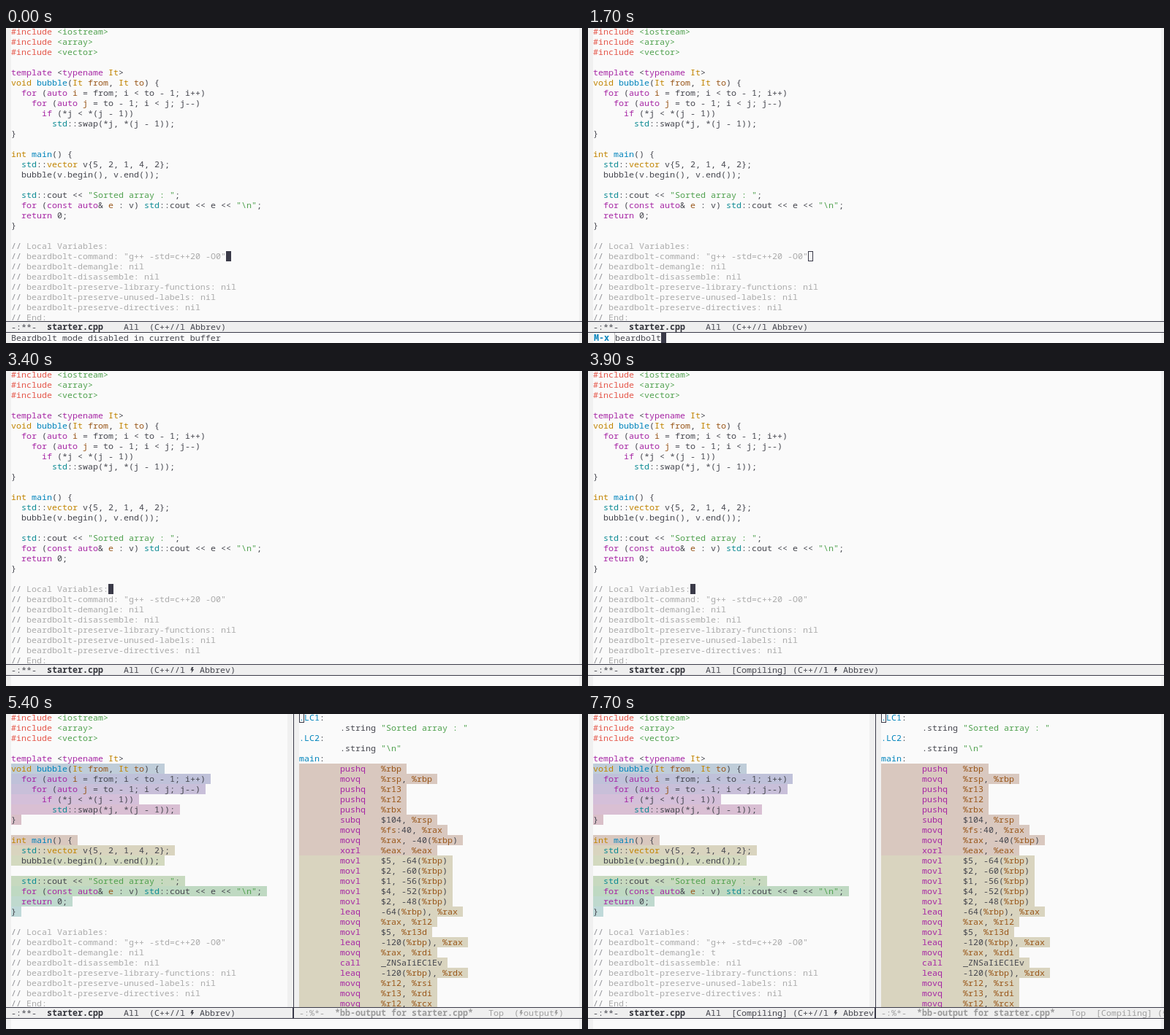
Recreate the animation shown at these times as an HTML page. Size 788x432 px, loop 8000 ms.

```html
<!DOCTYPE html>
<html lang="en">
<head>
<meta charset="utf-8">
<title>Editor session</title>
<style>
  html, body { margin: 0; width: 100%; height: 100%; overflow: hidden; background: #fafafa; }
  svg { display: block; width: 788px; height: 432px; }
  text { white-space: pre; font-kerning: none; font-variant-ligatures: none; }
</style>
</head>
<body>
<svg id="stage" viewBox="0 0 788 432" width="788" height="432">
  <defs>
    <clipPath id="paneClip"><rect width="788" height="402"/></clipPath>
    <clipPath id="leftClip"><rect id="leftBar" y="402" width="788" height="16"/></clipPath>
  </defs>
</svg>
<script>
const NS = 'http://www.w3.org/2000/svg';
const LOOP = 8000, CW = 7, LH = 14, LEFT = 7, RIGHT = 401;
const INK = '#3a3a48', PAPER = '#fafafa', FRINGE = '#f0f0f0';
const FONT = '"Noto Sans Mono", "DejaVu Sans Mono", monospace';

// One style letter per kind of token
const STYLES = {
  d: '#45464e', r: '#e45649', s: '#50a14f', k: '#a626a4', t: '#c18401',
  f: '#0184bc', v: '#99571a', n: '#0b8a93', m: '#8f9095', c: '#ababab',
  b: '#33343b', g: '#a0a0a0', G: '#9a9a9a', p: '#0a85bd'
};
const BOLD = 'bGp';

const svg = document.getElementById('stage');

// Pick the size at which one character is exactly one cell wide
const pen = document.createElement('canvas').getContext('2d');
pen.font = '100px ' + FONT;
const SIZE = CW * 100 / pen.measureText('M').width;
svg.setAttribute('font-family', FONT);
svg.setAttribute('font-size', SIZE);

function add(parent, tag, attrs, text) {
  const el = document.createElementNS(NS, tag);
  for (const key in attrs) el.setAttribute(key, attrs[key]);
  if (text !== undefined) el.textContent = text;
  parent.appendChild(el);
  return el;
}
const group = (parent, attrs) => add(parent, 'g', attrs);
const rect = (parent, x, y, width, height, fill) =>
  add(parent, 'rect', { x, y, width, height, fill });
const show = (el, on) => el.setAttribute('display', on ? 'inline' : 'none');
const rowTop = row => row * LH - 2;

function bolt(parent, x, base, fill) {
  add(parent, 'path', {
    d: `M${x + 2} ${base - 8}h2.4l-1 3h1.8l-3.8 5.6 .9-4.2h-1.8z`, fill
  });
}

// Odd pieces between bars start with a style letter; ⚡ is drawn as a shape
function write(parent, x, base, markup, plain = 'd') {
  markup.split('|').forEach((piece, i) => {
    const kind = i % 2 ? piece[0] : plain;
    const body = i % 2 ? piece.slice(1) : piece;
    for (const part of body.match(/⚡|\s+|[^\s⚡]+/g) || []) {
      if (part === '⚡') {
        bolt(parent, x, base, STYLES[kind]);
        x += 6;
        continue;
      }
      if (part.trim()) {
        add(parent, 'text', {
          x, y: base, fill: STYLES[kind],
          'font-weight': BOLD.includes(kind) ? 700 : 400
        }, part);
      }
      x += part.length * CW;
    }
  });
}

const bare = markup => markup.split('|').map((s, i) => i % 2 ? s.slice(1) : s).join('');

const comment = text => '|m//||c ' + text + '|';
const source = [
  '|r#include| |s<iostream>|',
  '|r#include| |s<array>|',
  '|r#include| |s<vector>|',
  '',
  '|ktemplate| <|ktypename| |tIt|>',
  '|tvoid| |fbubble|(|tIt| |vfrom|, |tIt| |vto|) {',
  '  |kfor| (|kauto| |vi| = from; i < to - 1; i++)',
  '    |kfor| (|kauto| |vj| = to - 1; i < j; j--)',
  '      |kif| (*j < *(j - 1))',
  '        |nstd|::swap(*j, *(j - 1));',
  '}',
  '',
  '|tint| |fmain|() {',
  '  |nstd|::|tvector| v{5, 2, 1, 4, 2};',
  '  bubble(v.begin(), v.end());',
  '',
  '  |nstd|::cout << |s"Sorted array : "|;',
  '  |kfor| (|kconst| |kauto|& |ve| : v) |nstd|::cout << e << |s"\\n"|;',
  '  |kreturn| 0;',
  '}',
  '',
  ...['Local Variables:', 'beardbolt-command: "g++ -std=c++20 -O0"',
    'beardbolt-demangle: ', 'beardbolt-disassemble: nil',
    'beardbolt-preserve-library-functions: nil',
    'beardbolt-preserve-unused-labels: nil',
    'beardbolt-preserve-directives: nil', 'End:'].map(comment)
];

const op = line => {
  const [name, ...args] = line.split(' ');
  const rest = args.join(' ').replace(/%\w+/g, '|v$&|');
  return '        |k' + name + '|' + ' '.repeat(8 - name.length) + rest;
};
const assembly = [
  '|f.LC1|:', '        .string |s"Sorted array : "|',
  '|f.LC2|:', '        .string |s"\\n"|', '|fmain|:',
  ...`pushq %rbp
movq %rsp, %rbp
pushq %r13
pushq %r12
pushq %rbx
subq $104, %rsp
movq %fs:40, %rax
movq %rax, -40(%rbp)
xorl %eax, %eax
movl $5, -64(%rbp)
movl $2, -60(%rbp)
movl $1, -56(%rbp)
movl $4, -52(%rbp)
movl $2, -48(%rbp)
leaq -64(%rbp), %rax
movq %rax, %r12
movl $5, %r13d
leaq -120(%rbp), %rax
movq %rax, %rdi
call _ZNSaIiEC1Ev
leaq -120(%rbp), %rdx
movq %r12, %rsi
movq %r13, %rdi
movq %r12, %rcx`.split('\n').map(op)
];

// Matching lines share a hue on both sides
const tint = step => `hsl(${22 + step * 26.5} 26% 80%)`;
const tintRows = [12, 13, 14, 16, 17, 18, 19, 5, 6, 7, 8, 9, 10];

function shade(parent, x, row, markup, step) {
  rect(parent, x, rowTop(row), (bare(markup).length + 1) * CW, LH, tint(step));
}
function listing(parent, x, lines) {
  lines.forEach((line, row) => write(parent, x, rowTop(row) + 11, line));
}
function outline(parent, x, y) {
  return add(parent, 'rect', {
    x: x + .5, y: y + .5, width: CW - 1, height: LH - 1,
    fill: 'none', stroke: INK, 'stroke-width': 1
  });
}

rect(svg, 0, 0, 788, 432, PAPER);
rect(svg, 0, 0, 7, 432, FRINGE);
rect(svg, 784, 0, 4, 432, FRINGE);

const panes = group(svg, { 'clip-path': 'url(#paneClip)' });
const split = group(panes);
rect(split, 385, 0, 16, 402, FRINGE);
tintRows.forEach((row, step) => shade(split, LEFT, row, source[row], step));
assembly.forEach((line, row) => {
  if (row > 4) shade(split, RIGHT, row, line, row < 14 ? 0 : 1);
});
listing(panes, LEFT, source);
listing(split, RIGHT, assembly);
outline(split, RIGHT, -2);
rect(split, 393, 0, 1, 402, INK);

const option = add(panes, 'text', { x: 168, y: rowTop(23) + 11, fill: STYLES.c });

// Mode lines
rect(svg, 0, 402, 788, 16, '#efefef');
const leftText = group(svg, { 'clip-path': 'url(#leftClip)' });
const rightText = group(svg);
rect(svg, 0, 402, 788, 1, INK);
rect(svg, 0, 417, 788, 1, INK);
const barEdge = rect(svg, 392, 402, 2, 16, INK);
const leftBar = document.getElementById('leftBar');

function modeLine(parent, x, name, where, tail, plain) {
  if (parent.dataset.tail === tail) return;
  parent.dataset.tail = tail;
  parent.replaceChildren();
  write(parent, x, 414, name + where + tail, plain);
}

const echo = add(svg, 'text', { x: LEFT, y: 429, fill: STYLES.d });
const prompt = group(svg);
write(prompt, 8, 429, '|pM-x|');
rect(prompt, 36, 418, 1, 14, '#b8b8b8');
const input = add(prompt, 'text', { x: 37, y: 429, fill: STYLES.d });

const hollow = outline(svg, 301, rowTop(22));
const block = rect(svg, 0, 0, CW, LH, INK);
const under = add(svg, 'text', { fill: PAPER });

const COMMAND = 'beardbolt-mode';
// time, characters typed
const typed = [[400, 0], [700, 2], [900, 3], [1000, 4], [1200, 5], [1400, 6], [1500, 7],
  [1600, 8], [1700, 9], [1800, 11], [1900, 12], [2000, 13], [2100, 14]];
// time, row, column, lit
const moves = [[0, 22, 42, 1], [2900, 22, 42, 0], [3400, 21, 19, 1], [4400, 21, 19, 0],
  [4900, 21, 19, 1], [5400, 21, 19, 0], [5900, 21, 19, 1], [6000, 22, 19, 1],
  [6300, 23, 19, 1], [6400, 23, 26, 1], [6800, 23, 23, 1], [7100, 23, 24, 1],
  [7600, 23, 24, 0]];
const latest = (list, t) => list.filter(entry => entry[0] <= t).pop();

function render(t) {
  const asking = t >= 400 && t < 2300;
  const isSplit = t >= 4300;
  const busy = (t >= 3900 && t < 4300) || t >= 7700 ? '[Compiling] ' : '';

  show(split, isSplit);
  show(rightText, isSplit);
  show(barEdge, isSplit);
  leftBar.setAttribute('width', isSplit ? 392 : 788);
  option.textContent = t < 6800 ? 'nil' : t < 7100 ? '' : 't';

  modeLine(leftText, LEFT, '-:**-  |bstarter.cpp|', '    All  ',
    busy + (t < 2300 ? '(C++//l Abbrev)' : '(C++//l ⚡ Abbrev)'), 'd');
  modeLine(rightText, RIGHT, '-:%*-  |G*bb-output for starter.cpp*|', '   Top  ',
    busy + '(⚡output⚡)', 'g');

  echo.textContent = asking || t >= 3400 ? ''
    : `Beardbolt mode ${t < 400 ? 'disabled' : 'enabled'} in current buffer`;
  show(prompt, asking);
  show(hollow, asking);

  let x, y, lit = 1, letter = '';
  if (asking) {
    const count = latest(typed, t)[1];
    input.textContent = COMMAND.slice(0, count);
    x = 37 + count * CW;
    y = 418;
  } else {
    const [, row, col, on] = latest(moves, t);
    x = LEFT + col * CW;
    y = rowTop(row);
    lit = on;
    letter = bare(source[row])[col] || '';
  }
  block.setAttribute('x', x);
  block.setAttribute('y', y);
  under.setAttribute('x', x);
  under.setAttribute('y', y + 11);
  under.textContent = letter;
  show(block, lit);
  show(under, lit);
}

const start = performance.now();
function tick() {
  render((performance.now() - start) % LOOP);
  requestAnimationFrame(tick);
}
tick();
</script>
</body>
</html>
```
